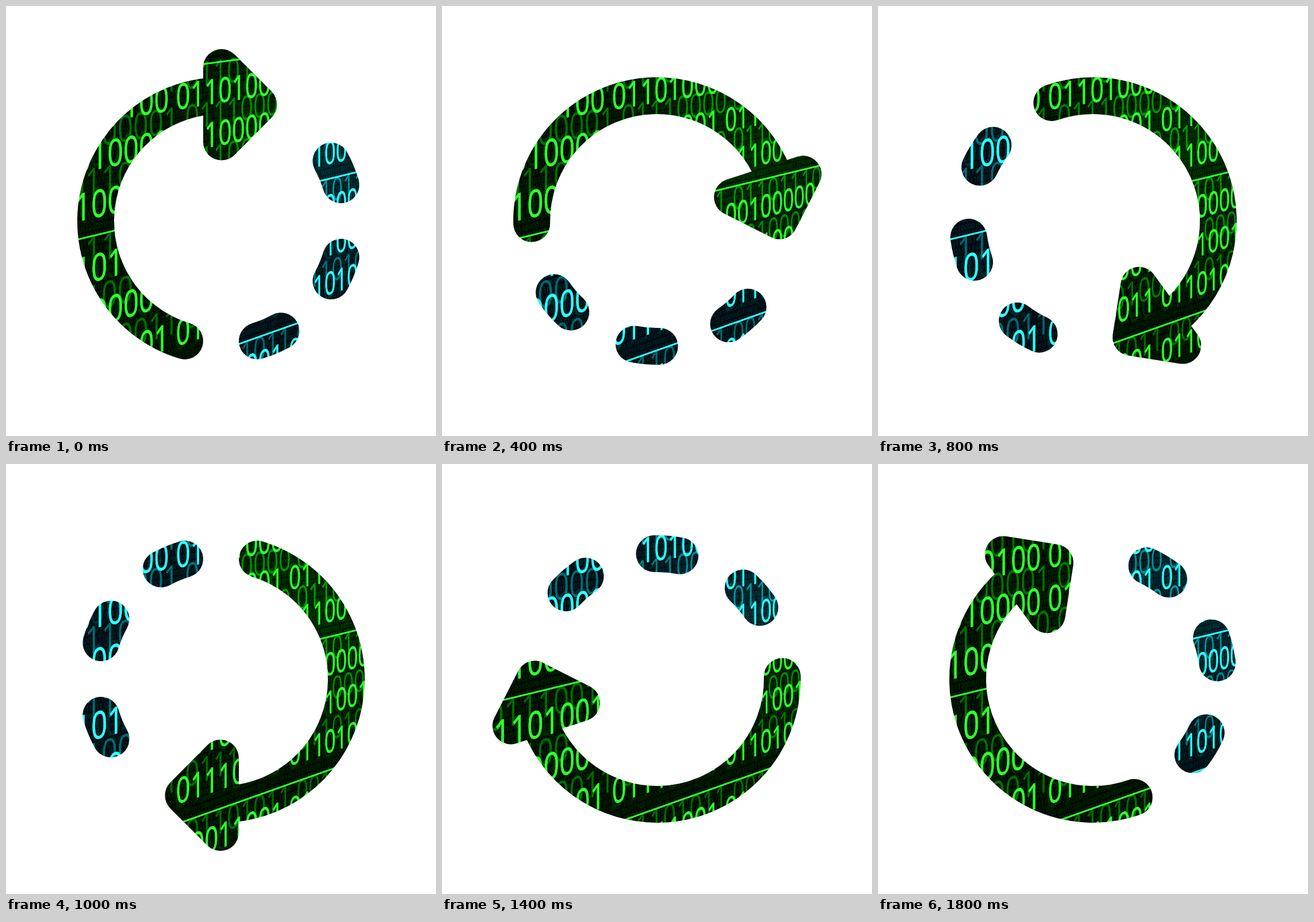
An HTML page with a canvas that plays this animation: 748 px wide and 748 px high, repeating every 2000 ms.

```html
<!DOCTYPE html>
<html lang="en">
<head>
<meta charset="utf-8">
<title>Binary refresh loop</title>
<style>
  html, body { margin: 0; width: 100%; height: 100%; overflow: hidden; background: #fff; }
  canvas { display: block; width: 748px; height: 748px; }
</style>
</head>
<body>
<canvas id="stage" width="748" height="748"></canvas>
<script>
const SIZE = 748, C = 374, RADIUS = 218, BAND = 64;
const STEP_MS = 200, STEPS = 10;
const RAD = Math.PI / 180;

// The wall of digits recedes to a vanishing point on the far right.
const VANISH = { x: 2611, y: -194 };
const DEPTH = VANISH.x - C;
const scaleAt = x => (VANISH.x - x) / DEPTH;
const yAt = (x, v) => VANISH.y + (v - VANISH.y) * scaleAt(x);

// [baseline at the stage centre, bytes]
const BRIGHT = [
  [168, '10010100 01101000 01101100'],
  [242, '00010000 01100001 01100110'],
  [318, '00100000 01101110 01100110'],
  [419, '01101001 01110100 00100000'],
  [492, '01100000 00100001 01110010'],
  [566, '01100101 01110011 01101001'],
  [668, '01110010 00011001 01101110']
];
const DIM = [
  [136, '01100101 01101011 00101110'],
  [206, '01000001 01110000 01101111'],
  [282, '00110010 01100100 01101110'],
  [390, '01110010 01100001 01101110'],
  [467, '01100101 01101001 00100000'],
  [543, '01100011 01110100 01101001'],
  [642, '01100011 01101011 00101101']
];
const LINES = [97, 346, 599];

function seeded(seed) {
  return () => (seed = (seed * 16807) % 2147483647) / 2147483647;
}

function makeTexture(bright, dim, base) {
  const cv = document.createElement('canvas');
  cv.width = cv.height = SIZE;
  const g = cv.getContext('2d');
  const rnd = seeded(77);
  const byte = () => Array.from({ length: 8 }, () => rnd() < 0.5 ? 0 : 1).join('');

  function putRow(str, v, size, pitch, x, alpha, bold) {
    g.font = `${size}px "Open Sans", "Noto Sans", sans-serif`;
    const narrow = pitch / (0.572 * size);
    for (const ch of str) {
      const k = scaleAt(x), adv = pitch * k * k;
      if (ch === ' ') { x += adv * 0.48; continue; }
      const y = yAt(x, v), sx = narrow * k * k;
      const glow = Math.exp(-((x - 540) ** 2 + (y - 270) ** 2) / 36000);
      g.globalAlpha = Math.min(1, alpha * (1 + 0.5 * glow));
      g.setTransform(sx, -sx * (v - VANISH.y) / DEPTH, 0, k, x, y);
      g.fillText(ch, 0, 0);
      if (bold) g.strokeText(ch, 0, 0);
      x += adv;
    }
    g.setTransform(1, 0, 0, 1, 0, 0);
    g.globalAlpha = 1;
  }

  g.fillStyle = base;
  g.fillRect(0, 0, SIZE, SIZE);
  const light = g.createRadialGradient(540, 270, 0, 540, 270, 260);
  light.addColorStop(0, `rgba(${dim},0.09)`);
  light.addColorStop(1, `rgba(${dim},0)`);
  g.fillStyle = light;
  g.fillRect(0, 0, SIZE, SIZE);

  g.textAlign = 'center';
  g.fillStyle = `rgb(${dim})`;
  for (let v = 60; v < 720; v += 12) {
    const str = Array.from({ length: 16 }, byte).join(' ');
    putRow(str, v, 11, 4.9, 70 + rnd() * 12, 0.18);
  }
  for (const [v, str] of DIM) putRow(str, v + 30, 60, 23.4, 70, 0.1);
  for (const [v, str] of DIM) putRow(str, v, 60, 23.4, 93, 0.42);

  g.fillStyle = g.strokeStyle = `rgb(${bright})`;
  g.lineWidth = 0.8;
  for (const [v, str] of BRIGHT) putRow(str, v, 60, 23.4, 74, 1, true);

  g.lineWidth = 3;
  for (const v of LINES) {
    g.beginPath();
    g.moveTo(0, yAt(0, v));
    g.lineTo(SIZE, yAt(SIZE, v));
    g.stroke();
  }
  return cv;
}

const ctx = document.getElementById('stage').getContext('2d');
const pattern = (...colors) => ctx.createPattern(makeTexture(...colors), 'no-repeat');
const green = pattern('51,255,51', '0,235,0', '#000d00');
const cyan = pattern('51,255,255', '0,225,235', '#000d12');

const DASHES = [[-28.6, -16.8], [16.8, 28.6], [61.4, 73.2]];
const HEAD = [[1, -267], [1, -137.5], [65.5, -202.5]];

function arc(from, to, turn) {
  ctx.beginPath();
  ctx.arc(C, C, RADIUS, (from + turn) * RAD, (to + turn) * RAD);
  ctx.stroke();
}

// Only the outline turns; the texture stays put.
function draw(turn) {
  ctx.clearRect(0, 0, SIZE, SIZE);
  ctx.lineWidth = BAND;
  ctx.lineCap = ctx.lineJoin = 'round';

  ctx.strokeStyle = cyan;
  for (const [from, to] of DASHES) arc(from, to, turn);

  ctx.strokeStyle = ctx.fillStyle = green;
  arc(106.8, 270, turn);
  const cos = Math.cos(turn * RAD), sin = Math.sin(turn * RAD);
  ctx.beginPath();
  for (const [x, y] of HEAD) ctx.lineTo(C + x * cos - y * sin, C + x * sin + y * cos);
  ctx.closePath();
  ctx.fill();
  ctx.stroke();
}

let shown = -1;
function tick() {
  const step = Math.floor(performance.now() / STEP_MS) % STEPS;
  if (step !== shown) draw((shown = step) * 360 / STEPS);
  requestAnimationFrame(tick);
}
tick();
</script>
</body>
</html>
```
